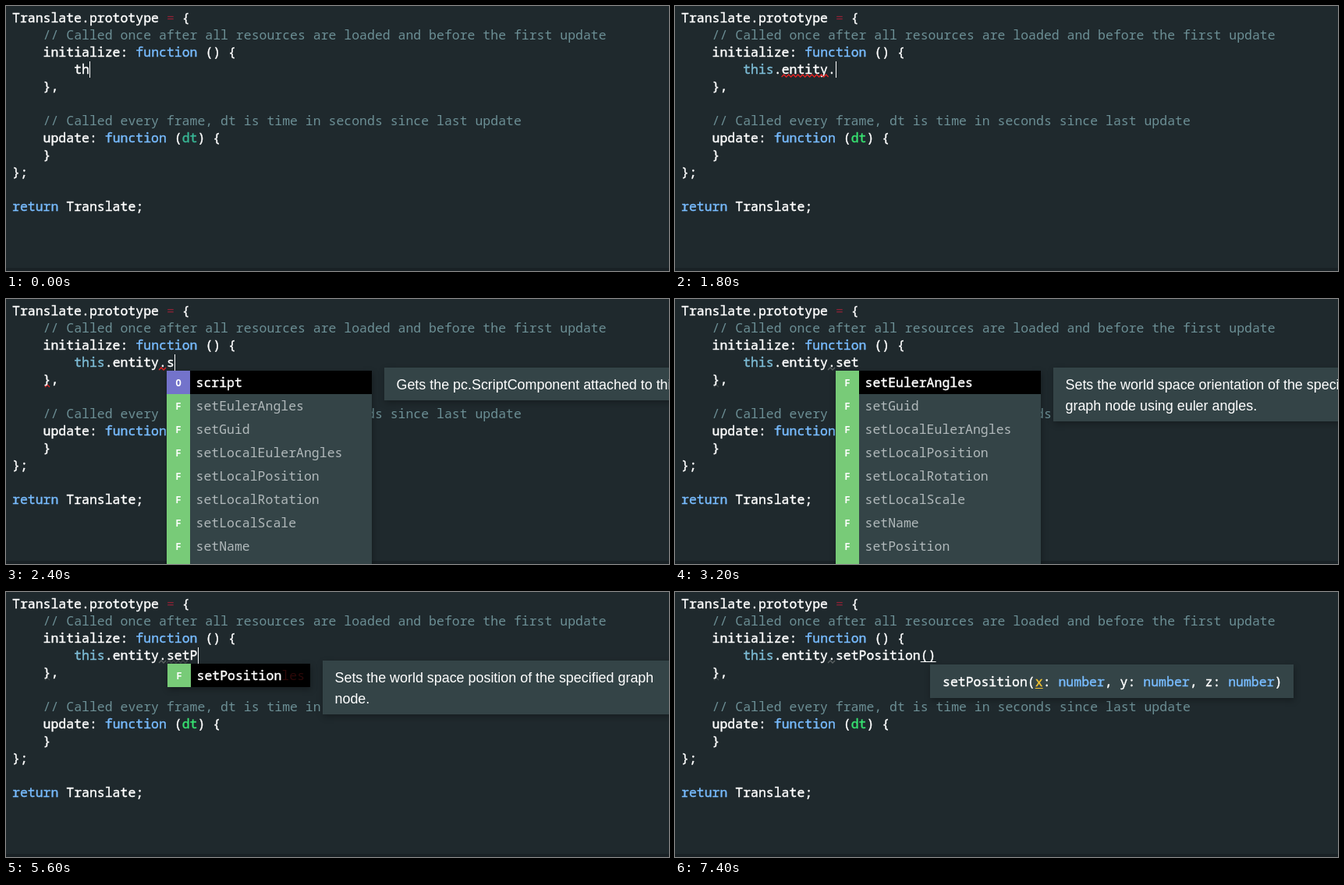
An HTML page with a canvas that plays this animation: 850x340 px, repeating every 8000 ms.

```html
<!DOCTYPE html>
<html lang="en">
<head>
<meta charset="utf-8">
<title>Code completion</title>
<style>
html, body { margin: 0; width: 100%; height: 100%; overflow: hidden; background: #1f292d; }
canvas { display: block; }
</style>
</head>
<body>
<canvas id="stage" width="850" height="340"></canvas>
<script>
const ctx = document.getElementById('stage').getContext('2d');
const LOOP = 8000, LEFT = 8, CHAR = 9.897, LINE = 22, ROW = 30;
const MONO = '16.495px "Noto Sans Mono", monospace';
const BADGE = 'bold 12px "Noto Sans Mono", monospace';
const SANS = '17.9px "Liberation Sans", Arial, sans-serif';
const C = {
  bg: '#1f292d', edge: '#192125', panel: '#344447', text: '#ffffff', dim: '#b1b9bb',
  comment: '#6c8f95', keyword: '#78bcff', self: '#7dbcd6', operator: '#8c2236',
  param: '#37e070', paramOld: '#38b594', error: '#e62222', faded: '#5c6263', trace: '#40484a',
  object: '#7373cb', func: '#78cb78', active: '#f3c332', ghost: '#2c0808'
};
const THIN = [C.comment, C.dim, C.operator, C.ghost];

const colX = col => LEFT + col * CHAR;

function text(str, x, y, color = C.text, font = MONO) {
  ctx.font = font;
  ctx.fillStyle = color;
  ctx.fillText(str, x, y);
  // A hairline outline gives code its slightly heavier weight.
  if (font === MONO && !THIN.includes(color)) {
    ctx.strokeStyle = color;
    ctx.lineWidth = 0.4;
    ctx.strokeText(str, x, y);
  }
}

function rect(x, y, w, h, color) {
  ctx.fillStyle = color;
  ctx.fillRect(x, y, w, h);
}

// Draws [text, color] pieces one after another on the character grid.
function pieces(list, x, y) {
  for (const [str, color] of list) {
    text(str, x, y, color);
    x += str.length * CHAR;
  }
}

function codeLine(row, col, ...list) {
  pieces(list, colX(col), 21 + row * LINE);
}

function squiggle(x1, x2, y, color) {
  ctx.beginPath();
  for (let x = x1, up = false; x <= x2; x += 3, up = !up) ctx.lineTo(x, y + (up ? -1.5 : 1.5));
  ctx.strokeStyle = color;
  ctx.lineWidth = 1.3;
  ctx.stroke();
}

function panel(x, y, w, h) {
  ctx.save();
  ctx.shadowColor = 'rgba(0,0,0,0.3)';
  ctx.shadowBlur = 8;
  ctx.shadowOffsetX = 1;
  ctx.shadowOffsetY = 3;
  rect(x, y, w, h, C.panel);
  ctx.restore();
}

// Items are written as "F name" or "O name"; the first one is selected.
function completions({ x, w, items, ghost }) {
  panel(x, 92, w, items.length * ROW);
  items.forEach((item, i) => {
    const top = 92 + i * ROW, kind = item[0], labelX = x + 37.5;
    rect(x, top, ROW, ROW, kind === 'O' ? C.object : C.func);
    if (i === 0) rect(x + ROW, top, w - ROW, ROW, '#000');
    ctx.textAlign = 'center';
    text(kind, x + 15, top + 19.5, C.text, BADGE);
    ctx.textAlign = 'left';
    if (ghost) text(ghost, labelX + 11 * CHAR, top + 21, C.ghost);
    text(item.slice(2), labelX, top + 21, i ? C.dim : C.text);
  });
}

function docs({ x, lines }) {
  panel(x, 88, 860 - x, 15 + lines.length * 27);
  lines.forEach((line, i) => text(line, x + 15.5, 116 + i * 27, C.text, SANS));
}

function signature() {
  panel(327, 93, 466, 43);
  const num = ['number', C.keyword];
  pieces([['setPosition('], ['x', C.active], [': '], num, [', y: '], num, [', z: '], num, [')']], 343, 121);
  rect(343 + 12 * CHAR, 123, CHAR, 1, C.active);
}

const memberList = {
  x: 137, w: 174, items: ['O entity', 'F initialize', 'F update']
};
const entityList = {
  x: 206, w: 263,
  items: ['F addChild', 'F addComponent', 'F addLabel', 'O animation', 'O audiosource',
    'O camera', 'F clone', 'O collision', 'F destroy']
};
const setters = ['EulerAngles', 'Guid', 'LocalEulerAngles', 'LocalPosition', 'LocalRotation',
  'LocalScale', 'Name', 'Position', 'Rotation'].map(name => 'F set' + name);
const sList = { x: 206, w: 263, items: ['O script', ...setters.slice(0, 8)] };
const setList = { x: 206, w: 263, items: setters };
const exactList = { x: 207, w: 183, items: ['F setPosition'], ghost: 'les' };

const childDocs = { x: 485, lines: ['Add a new child to the child list and update the', 'parent value of the child node.'] };
const scriptDocs = { x: 485, lines: ['Gets the pc.ScriptComponent attached to this entity.'] };
const anglesDocs = { x: 485, lines: ['Sets the world space orientation of the specified', 'graph node using euler angles.'] };
const positionDocs = { x: 406, lines: ['Sets the world space position of the specified graph', 'node.'] };

// Each step changes some of the state and keeps the rest.
// lint: [first, last] column of the red underline; brace: lint color under "}";
// trace: last column of the faint underline.
const steps = [
  { at: 0, code: 'th', caret: 2 },
  { at: 200, code: 'thi', caret: 3 },
  { at: 400, code: 'this.', caret: 5 },
  { at: 600, list: memberList },
  { at: 1000, caret: -1, lint: [4, 5], brace: C.error },
  { at: 1200, code: 'this.entity', caret: 11, list: null },
  { at: 1800, code: 'this.entity.', caret: 12, lint: [5, 11.2], brace: null },
  { at: 2000, list: entityList, docs: childDocs },
  { at: 2400, code: 'this.entity.s', caret: 13, list: sList, docs: scriptDocs, lint: [11, 12], brace: C.error },
  { at: 2600, code: 'this.entity.set', caret: 15, list: setList, docs: anglesDocs },
  { at: 3200, caret: -1, lint: null, brace: C.trace, faded: true },
  { at: 3600, code: 'this.entity.setP', caret: 16, list: exactList, docs: positionDocs, trace: 15 },
  { at: 4000, caret: -1 },
  { at: 4600, caret: 16 },
  { at: 5200, caret: -1 },
  { at: 5600, caret: 16 },
  { at: 6000, code: 'this.entity.setPosition', caret: 23, list: null, docs: null, trace: 0 },
  { at: 6600, caret: -1, lint: [12, 23] },
  { at: 7000, code: 'this.entity.setPosition()', caret: 24, sign: true },
  { at: 7400, caret: -1, lint: null }
];

function stateAt(time) {
  return Object.assign({}, ...steps.filter(step => step.at <= time));
}

function drawCode(code, paramColor) {
  codeLine(0, 0, ['Translate.prototype '], ['=', C.operator], [' {']);
  codeLine(1, 4, ['// Called once after all resources are loaded and before the first update', C.comment]);
  codeLine(2, 4, ['initialize: '], ['function', C.keyword], [' () {']);
  const known = code.startsWith('this');
  codeLine(3, 8, [code.slice(0, 4), known ? C.self : C.text], [code.slice(4)]);
  codeLine(4, 4, ['},']);
  codeLine(6, 4, ['// Called every frame, dt is time in seconds since last update', C.comment]);
  codeLine(7, 4, ['update: '], ['function', C.keyword], [' ('], ['dt', paramColor], [') {']);
  codeLine(8, 4, ['}']);
  codeLine(9, 0, ['};']);
  codeLine(11, 0, ['return', C.keyword], [' Translate;']);
}

function draw(time) {
  const s = stateAt(time);
  const underline = (from, to, color) => squiggle(colX(8 + from), colX(8 + to), 89.5, color);
  rect(0, 0, 850, 340, C.bg);
  rect(0, 336, 850, 4, C.edge);
  if (s.trace) underline(12, s.trace, C.trace);
  if (s.faded) underline(11, 12, C.faded);
  if (s.brace) squiggle(50, 58, 111.5, s.brace);
  drawCode(s.code, time < 600 ? C.paramOld : C.param);
  if (s.lint) underline(...s.lint, C.error);
  if (s.sign) rect(colX(31), 89, 2 * CHAR, 1, C.text);
  if (s.caret >= 0) rect(Math.round(colX(8 + s.caret)), 71, 1, 21, C.text);
  if (s.list) completions(s.list);
  if (s.docs) docs(s.docs);
  if (s.sign) signature();
}

const start = performance.now();
function tick() {
  draw((performance.now() - start) % LOOP);
  requestAnimationFrame(tick);
}
draw(0);
requestAnimationFrame(tick);
</script>
</body>
</html>
```
